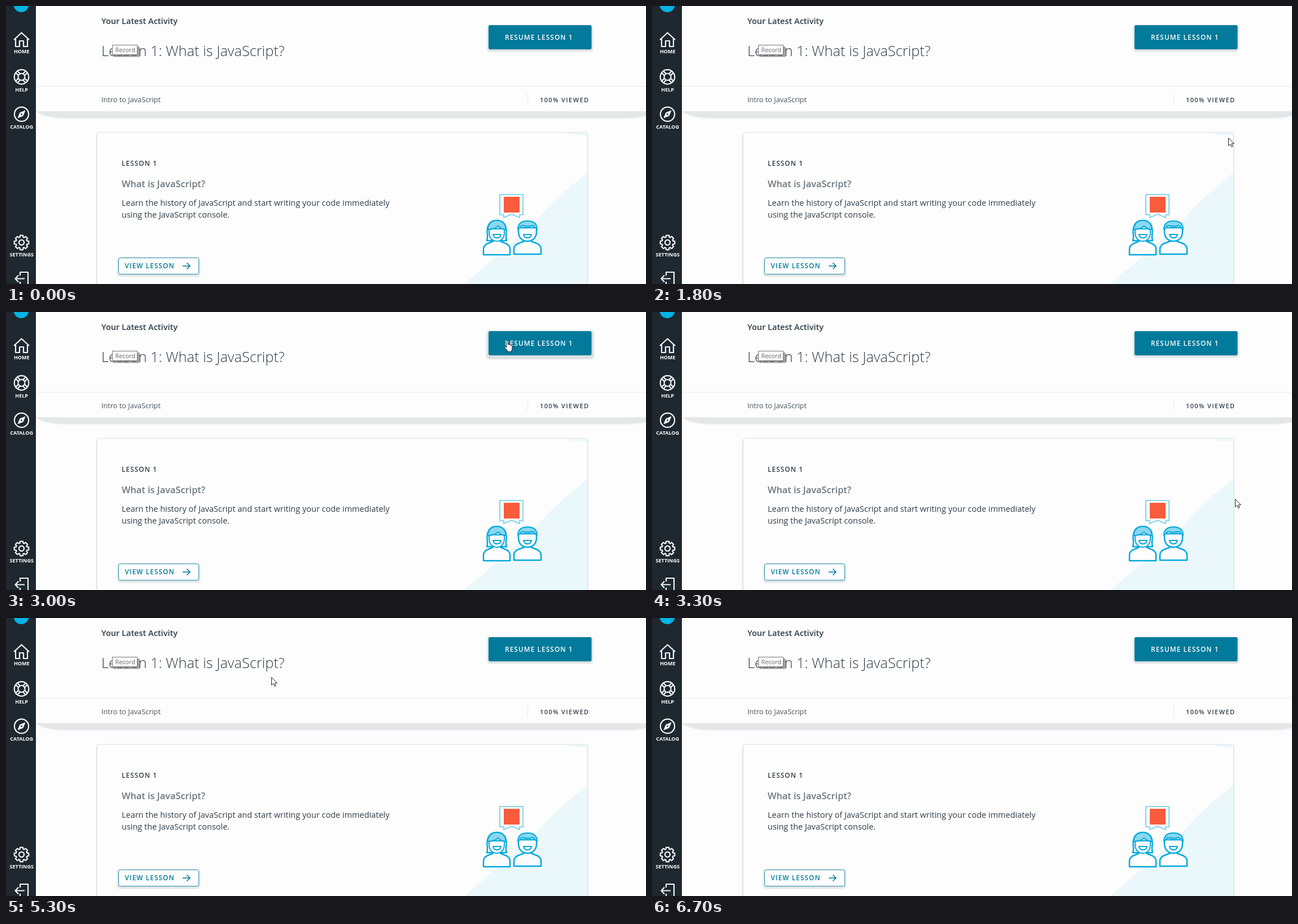
Animation, 1134 px wide and 494 px high, one loop 8000 ms. Source, as an HTML page:

```html
<!DOCTYPE html>
<html lang="en">
<head>
<meta charset="utf-8">
<title>Lesson dashboard</title>
<style>
  html, body { margin: 0; width: 100%; height: 100%; overflow: hidden; background: #fdfdfd; }
  svg { display: block; font-family: "Open Sans", sans-serif; fill: #2e3d49; }
  .semi { font-weight: 600; }
  .caps { font-size: 11.8px; font-weight: 600; letter-spacing: 1.1px; }
  .small { font-size: 10.9px; font-weight: 600; letter-spacing: 1.45px; }
  .nav text { font-size: 9px; font-weight: 700; fill: #fff; text-anchor: middle; }
  .icon { fill: none; stroke: #f4f7f8; stroke-width: 2.2; stroke-linejoin: round; }
  .people { fill: #fdfdfd; stroke: #02a9dc; stroke-width: 2.5; stroke-linejoin: round; }
  .people .hair { fill: #8ad7ee; }
</style>
</head>
<body>
<svg width="1134" height="494" viewBox="0 0 1134 494">
  <defs>
    <filter id="soft" x="-10%" y="-30%" width="120%" height="160%"><feGaussianBlur stdDeviation=".9"/></filter>
    <clipPath id="cardClip"><rect x="162" y="225.5" width="868" height="300" rx="5"/></clipPath>
  </defs>

  <!-- header -->
  <path d="M53 187H1134V197Q1118 201 1096 201H104Q66 200 53 187Z" fill="#f1f7f9"/>
  <path d="M53 187H1134V195Q1118 199 1096 199H104Q66 198 53 187Z" fill="#e5e7e7"/>
  <path d="M53 142.5H1134M924.5 154V176" stroke="#e6e8ea"/>
  <text class="semi" x="169" y="32" font-size="14.55">Your Latest Activity</text>
  <text x="169" y="89" font-size="25.35" font-weight="300">Lesson 1: What is JavaScript?</text>
  <text x="169" y="170.5" font-size="12.73" fill="#47545e">Intro to JavaScript</text>
  <text class="small" x="946" y="170.5">100% VIEWED</text>

  <rect x="191" y="72" width="45.5" height="18.5" fill="#707070" opacity=".65"/>
  <rect x="188.5" y="69.5" width="44" height="17" fill="#fff" stroke="#777"/>
  <text x="193.5" y="82" font-size="10.9" fill="#666">Record</text>

  <g filter="url(#soft)">
    <rect id="resumeShadow" fill="#dadfe1" rx="5"/>
  </g>
  <rect x="855" y="34" width="182.5" height="43" rx="3" fill="#017a9b"/>
  <text class="caps" x="884" y="59.5" style="fill:#fff">RESUME LESSON 1</text>

  <!-- lesson card -->
  <g filter="url(#soft)">
    <rect id="cardShadow" x="160.5" y="225" width="870.5" height="300" rx="6" fill="#ccd6da"/>
  </g>
  <rect x="161.5" y="224.5" width="869" height="300" rx="5" fill="#fdfdfd" stroke="#dbe2e5"/>
  <path clip-path="url(#cardClip)" fill="#ebf8fb"
    d="M996 225H1031V231L1018 229H1000ZM1031 296L1000 321 960 358 936 386 880 436 812 494H1031Z"/>
  <text class="caps" x="205" y="283.5">LESSON 1</text>
  <text class="semi" x="205" y="321.5" font-size="16.36" fill="#6b7780">What is JavaScript?</text>
  <g font-size="14.49">
    <text x="205" y="354.5">Learn the history of JavaScript and start writing your code immediately</text>
    <text x="205" y="376">using the JavaScript console.</text>
  </g>
  <rect x="197" y="447" width="147" height="34" rx="5" fill="#dde4e7" filter="url(#soft)"/>
  <rect x="199.5" y="447.5" width="142" height="29" rx="3" fill="#fdfdfd" stroke="#2b8dab"/>
  <text class="caps" x="210.5" y="466" style="fill:#017a9b">VIEW LESSON</text>
  <path d="M313 462H326M320.5 456.5L326 462 320.5 467.5" fill="none" stroke="#017a9b" stroke-width="1.6"/>

  <g class="people">
    <path d="M875 335H916V371H910V376L896 370 882 376V371H875Z" stroke="#8ad7ee" stroke-width="2.2"/>
    <rect x="882" y="339" width="28" height="28" fill="#f95c3c" stroke="none"/>
    <path d="M852 417C855 409 851 404 853 395C855 385 862 381 870 381S885 386 886 395C888 404 884 409 887 417Z"/>
    <path d="M846 442V432Q846 424 856 421L863 418V415H876V418L883 421Q893 424 893 432V442Z"/>
    <path d="M856 396V404Q857 417 870 418Q882 417 883 404V396Z" stroke-width="2"/>
    <path class="hair" d="M853 397C855 385 862 381 870 381S885 386 886 397Q877 397 872 391Q866 397 853 397Z" stroke-width="2"/>
    <path d="M863 406H877Q876 412 870 412T863 406Z" stroke-width="2"/>
    <path d="M900 441V432Q900 424 910 421L918 418V414H930V418L938 421Q948 424 948 432V441Z"/>
    <path d="M908 394H940V402Q939 417 924 418Q909 417 908 402Z"/>
    <path class="hair" d="M907 397Q907 382 924 382T941 397Q937 394 934 390Q924 393 914 390Q911 394 907 397Z" stroke-width="2"/>
    <path d="M917 406H931Q930 412 924 412T917 406Z" stroke-width="2"/>
  </g>

  <!-- sidebar -->
  <rect width="53" height="494" fill="#1f282f"/>
  <circle cx="27" cy="-2.5" r="13.5" fill="#02b3e4"/>
  <g class="nav">
    <text x="27.7" y="84">HOME</text>
    <text x="27.7" y="152.3">HELP</text>
    <text x="27.7" y="217.5">CATALOG</text>
    <text x="27.7" y="445.3">SETTINGS</text>
  </g>
  <g class="icon">
    <path d="M14 60L27.5 47.5 41 60M17 58V72H24V62H31V72H38V58"/>
    <g transform="translate(27.5 126)">
      <circle r="12.8"/><circle r="6"/>
      <path id="ropes"/>
    </g>
    <g transform="translate(27.5 192.3)">
      <circle r="12.6"/>
      <path d="M6-6L2.5 2.5-6 6-2.5-2.5Z" stroke-width="1.4" fill="#f4f7f8"/>
      <circle r="1.4" fill="#1f282f" stroke="none"/>
    </g>
    <g transform="translate(27.5 420.3)"><path id="gear"/><circle r="4.6"/></g>
    <path d="M25 479V473H39V500H25V490M33 484.5H17M22 478.5L16.5 484.5 22 490.5"/>
  </g>

  <g id="cursor" stroke="#222" stroke-linejoin="round" fill="#fff">
    <path id="arrow" d="M.5.5V14.5L3.8 11.5 6 16.4 8.2 15.4 6 10.7H10.5Z"/>
    <path id="hand" d="M4 11V2.3Q4 .6 5.4.6T6.8 2.3V7Q9 5.8 9.4 7.4Q11.4 6.6 11.8 8.4Q14 7.9 14 10V14Q14 16 12.6 17.6V19.5H5.6V17.6L1 12.4Q.2 10.6 1.6 10.2T4 12Z"/>
  </g>
</svg>
<script>
const $ = id => document.getElementById(id);
const LOOP = 8000, STEP = 100;

// pointer stops: time, x, y; straight moves between them
const stops = [
  [1000, 207, 22], [1200, 710, 253], [1500, 710, 253], [1600, 820, 285], [1800, 1021, 234],
  [1900, 1110, 205], [2100, 759, 184], [2200, 759, 184], [2300, 759, 182], [2700, 759, 182],
  [3000, 883, 51], [3100, 960, 62], [3300, 1033, 332], [3600, 470, 104],
  [5200, 470, 104], [5300, 470, 105], [5500, 470, 105], [5900, 609, 198], [6200, 609, 198],
  [6400, 570, 410], [6500, 560, 500]
];

const polar = (r, a) => `${(r * Math.cos(a)).toFixed(2)} ${(r * Math.sin(a)).toFixed(2)}`;

function drawIcons() {
  let ropes = "", teeth = [];
  for (let i = 0; i < 4; i++) {
    const a = Math.PI * (i + .5) / 2;
    for (const s of [-1, 1]) ropes += `M${polar(6, a + s * .36)}L${polar(12.8, a + s * .17)}`;
  }
  for (let i = 0; i < 8; i++) {
    const a = i * Math.PI / 4;
    for (const [r, d] of [[10, -.3], [13, -.19], [13, .19], [10, .3]]) teeth.push(polar(r, a + d));
  }
  $("ropes").setAttribute("d", ropes);
  $("gear").setAttribute("d", `M${teeth.join("L")}Z`);
}

function pointerAt(t) {
  const i = stops.findIndex(s => s[0] > t);
  if (i < 1) return null;
  const [t0, x0, y0] = stops[i - 1], [t1, x1, y1] = stops[i];
  const k = (t - t0) / (t1 - t0);
  return [Math.round(x0 + (x1 - x0) * k), Math.round(y0 + (y1 - y0) * k)];
}

function place(id, x, y, width, height) {
  for (const [key, value] of Object.entries({ x, y, width, height })) $(id).setAttribute(key, value);
}

function render(now) {
  const t = Math.floor(now % LOOP / STEP) * STEP;
  const pos = pointerAt(t);
  const overButton = t >= 3000 && t < 3200;
  const overCard = t >= 1600 && t < 1800 || t >= 6300 && t < 6700;

  $("cursor").style.display = pos ? "" : "none";
  if (pos) $("cursor").setAttribute("transform", `translate(${pos})`);
  $("arrow").style.display = overButton ? "none" : "";
  $("hand").style.display = overButton ? "" : "none";

  if (overButton) place("resumeShadow", 851, 33, 191, 51);
  else place("resumeShadow", 852.5, 34, 187.5, 47);
  $("cardShadow").setAttribute("fill", overCard ? "#aab8be" : "#ccd6da");
  requestAnimationFrame(render);
}

drawIcons();
requestAnimationFrame(render);
</script>
</body>
</html>
```
